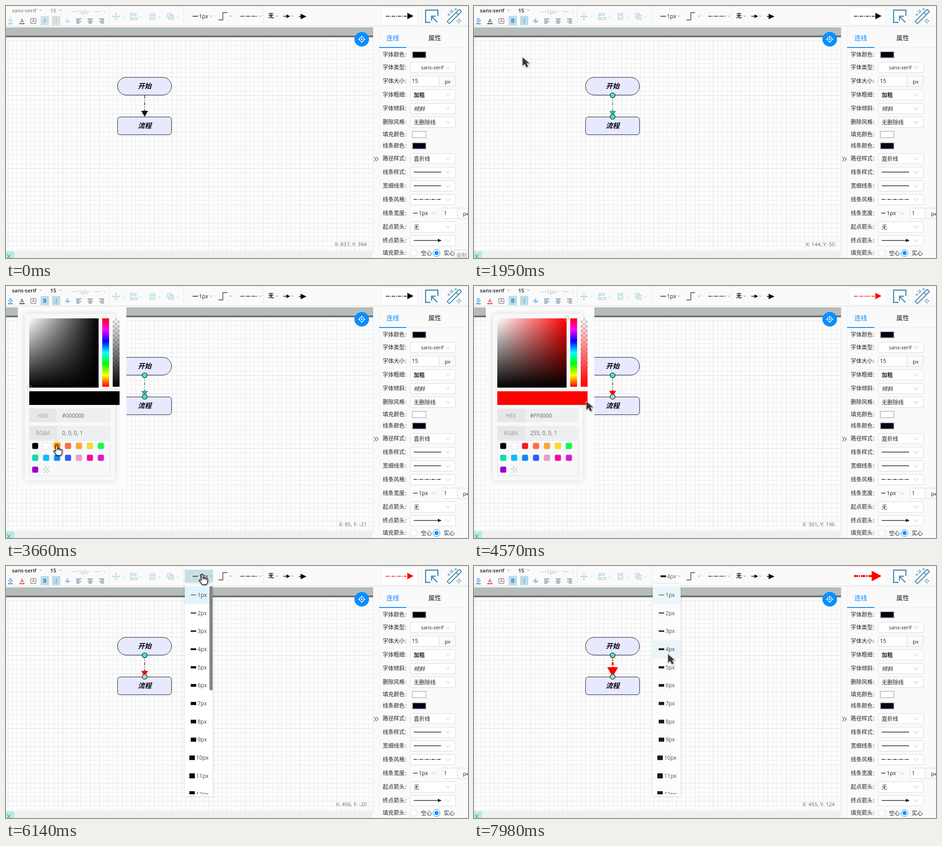
Write an HTML page with a canvas that moves like this. It is 1013 px wide and 553 px high and loops after 8000 ms.

```html
<!DOCTYPE html>
<html lang="zh">
<head>
<meta charset="utf-8">
<style>
html, body { margin: 0; width: 100%; height: 100%; overflow: hidden; background: #fafafa; }
canvas { display: block; }
</style>
</head>
<body>
<canvas id="stage" width="1013" height="553"></canvas>
<script>
const c = document.getElementById('stage').getContext('2d');
const FONT = '"Open Sans", "Noto Sans CJK SC", "Noto Sans CJK", sans-serif';
const BLUE = '#0a8eff', INK = '#050510', RED = '#ff0000', ICE = '#a9d3df', STEEL = '#4489ab';
const LOOP = 8000, STEP = 130.7;

// Tracks: [step, x, y], linear between the points
const cursorTrack = [[0, 1030, 600], [1, 990, 545], [7, 341, 210], [10, 304, 212], [11, 304, 212],
  [15, 106, 112], [18, 35, 36], [23, 35, 36], [27, 111, 349], [30, 111, 349], [37, 300, 214],
  [38, 306, 206], [39, 306, 206], [43, 430, 18], [47, 430, 18], [54, 425, 112], [58, 425, 193]];
const coordTrack = [[0, 837, 394], [2, 837, 394], [7, 383, 152], [10, 346, 154], [11, 346, 154],
  [15, 144, 50], [18, 85, -21], [34, 85, -21], [35, 301, 196], [38, 349, 152], [39, 349, 152],
  [43, 456, -20], [59, 456, -20], [60, 455, 124]];

function at(track, n) {
  const i = track.findIndex(p => p[0] > n);
  if (i < 0) return track[track.length - 1].slice(1);
  const a = track[i - 1], b = track[i], k = (n - a[0]) / (b[0] - a[0]);
  return [a[1] + (b[1] - a[1]) * k, a[2] + (b[2] - a[2]) * k];
}

function rect(x, y, w, h, fill, stroke, r = 0, width = 1) {
  c.beginPath();
  c.roundRect(x, y, w, h, r);
  paint(fill, stroke, width);
}
function paint(fill, stroke, width = 1) {
  if (fill) { c.fillStyle = fill; c.fill(); }
  if (stroke) { c.strokeStyle = stroke; c.lineWidth = width; c.stroke(); }
}
function path(d, stroke, width = 1, fill) {
  const p = new Path2D(d);
  if (fill) { c.fillStyle = fill; c.fill(p); }
  if (stroke) { c.strokeStyle = stroke; c.lineWidth = width; c.stroke(p); }
}
function dot(x, y, r, fill, stroke, width) {
  c.beginPath();
  c.arc(x, y, r, 0, 7);
  paint(fill, stroke, width);
}
function text(s, x, y, color = '#222', size = 12, style = '', align = 'left') {
  c.font = `${style} ${size}px ${FONT}`;
  c.fillStyle = color;
  c.textAlign = align;
  c.textBaseline = 'alphabetic';
  c.fillText(s, x, y + size * .36);
}
function dashed(d, color, width, dash = [7, 2, 2, 2]) {
  c.setLineDash(dash);
  path(d, color, width);
  c.setLineDash([]);
}
const chevron = (x, y, color = '#777', s = 2.3) => path(`M${x - s} ${y - s / 2}l${s} ${s}l${s} ${-s}`, color);
const bigChevron = (x, y) => path(`M${x - 5} ${y - 3}l5 6l5 -6`, '#bbb');
function ramp(x0, y0, x1, y1, colors) {
  const g = c.createLinearGradient(x0, y0, x1, y1);
  colors.forEach((k, i) => g.addColorStop(i / (colors.length - 1), k));
  return g;
}
function checker(x, y, w, h, s) {
  rect(x, y, w, h, '#fff');
  for (let i = 0; i * s < w; i++)
    for (let j = 0; j * s < h; j++)
      if ((i + j) % 2) rect(x + i * s, y + j * s, Math.min(s, w - i * s), Math.min(s, h - j * s), '#d4d4d4');
}

function drawBoard() {
  rect(0, 47, 805, 506, '#fdfdfd');
  for (let x = 4; x < 805; x += 10) rect(x, 68, 1, 470, x % 40 == 4 ? '#e2e2e2' : '#ebebeb');
  for (let y = 76; y < 538; y += 10) rect(0, y, 805, 1, y % 40 == 36 ? '#e2e2e2' : '#ebebeb');
  rect(0, 47, 805, 18, '#b5bcba');
  rect(0, 65, 805, 3, '#626466');
  rect(0, 68, 805, 2, '#d5d5d5');
  rect(0, 538, 805, 15, '#f0f0f0');
  rect(0, 538, 18, 15, '#b5ece4');
  path('M2 545l8 9M10 545l-8 9', '#456');
  dot(780, 73, 16, BLUE);
  dot(780, 73, 5, null, '#fff', 1.5);
  dot(780, 73, 1.8, '#fff');
  path('M780 65v4M780 77v4M772 73h4M784 73h4', '#fff', 1.5);
}

function drawFlow(n) {
  const picked = n >= 10, red = n >= 29, thick = n >= 60;
  const color = red ? RED : picked ? '#4aa3a3' : INK;
  const [base, half] = thick ? [222, 12] : [230, 7.5];
  dashed(`M304 196V${base}`, thick ? RED : red ? INK : color, thick ? 4 : picked && !red ? 2 : 1.2, [7, 3, 2, 3]);
  path(`M304 243L${304 - half} ${base}H${304 + half}Z`, null, 0, color);
  rect(244.5, 156.5, 118.5, 39, '#e7e9ff', '#15151f', 19.5);
  rect(244.5, 243.5, 118.5, 39, '#e7e9ff', '#15151f', 6);
  text('开始', 304, 176, '#080810', 15, 'italic bold', 'center');
  text('流程', 304, 263, '#080810', 15, 'italic bold', 'center');
  if (picked) {
    dot(304, 196, 5.5, '#3fe8c3', '#111', 1.2);
    dot(304, 243, 5.5, red ? '#a2dcc6' : '#3fe8c3', '#111', 1.2);
  }
}

function drawToolbar(n) {
  const on = n >= 10, red = n >= 30, ink = on ? '#1b1b1b' : '#8f8f8f';
  rect(0, 0, 1013, 47, '#fafafa');
  rect(0, 43, 1013, 1, '#e3e3e3');
  rect(0, 44, 1013, 3, '#f5f5f5');
  for (const x of [226, 389, 564]) rect(x, 0, 1, 43, '#e9e9e9');

  text('sans-serif', 13, 10, ink, 11.5, '600');
  text('15', 97, 10, ink, 11.5, '600');
  chevron(76, 9); chevron(119.5, 9);
  path('M145 12.5h13M194 12.5h13', '#bbb');
  text('1px', 159, 13, '#bbb', 12);
  chevron(183, 12, '#bbb'); chevron(217, 12, '#bbb');

  const tone = on ? '#258edb' : '#91c8eb';
  path('M6 32l4-4l4 4l-4 4zM8 26l3 3', tone, 1.2);
  rect(4, 38, 11, 2, tone);
  if (n >= 18 && n < 24) rect(27, 23, 17, 20, '#d5e4e8');
  const pen = red ? RED : on ? '#111' : '#444';
  text('A', 35, 33, pen, 12, '', 'center');
  rect(29, 38, 12, 1.5, pen);
  rect(54.5, 27.5, 11, 11, null, '#666');
  text('A', 60, 33, '#555', 9, '', 'center');
  for (const x of [76, 101]) rect(x, 22, 18, 20, on ? '#bbdce5' : '#d5e1e3');
  text('B', 85, 33, tone, 12, 'bold', 'center');
  text('I', 110, 33, tone, 13, 'italic', 'center');
  text('S', 135, 33, tone, 12, '', 'center');
  path('M129 33.5h12', tone);
  [0, 2, 4].forEach((k, i) => {
    const x = 154 + i * 25;
    path(`M${x} 28.5h11M${x + k} 31.5h7M${x} 34.5h11M${x + k} 37.5h7`, '#174a68', 1.2);
  });

  path('M241 16v14M234 23h14M239 18l2-2l2 2M239 28l2 2l2-2M236 21l-2 2l2 2M246 21l2 2l-2 2', ICE, 1.3);
  path('M273.5 15v17M276 16.5h9v4h-9zM276 25.5h13v4h-13z', ICE, 1.5);
  path('M314 16.5h14M314 29.5h14M316 20h10v6h-10z', ICE, 1.5);
  path('M354 16.5h9v9h-9zM358 20.5h9v9h-9z', ICE, 1.5);
  for (const x of [257, 297, 337, 376]) chevron(x, 24, ICE);

  if (n >= 45 && n < 50) rect(392, 8, 62, 28, '#c7dfe5');
  const thick = n >= 60;
  path('M409 22.5h12', '#111', thick ? 4 : 1.4);
  text(thick ? '4px' : '1px', 423, 23, thick ? '#666' : '#222', 12);
  chevron(449.5, 22);
  path('M466 30.5h9.5v-16h9.5', '#333', 1.3);
  chevron(493, 22);
  dashed('M514 22.5h37', '#222', 1.3);
  chevron(558, 22);
  text('无', 575, 22, '#111', 12, 'bold'); chevron(594, 22);
  path('M608 22.5h8', INK, 1.4);
  path('M615 18.5l8 4l-8 4z', null, 0, INK);
  chevron(628, 22);
  path('M642 23h6', INK, 1.4);
  path('M646 17l13 6l-13 6z', null, 0, INK);

  rect(823.5, 3.5, 79, 38, '#fff', '#f0f0f0');
  const color = n >= 29 ? RED : INK;
  if (thick) {
    dashed('M833 22h40', color, 4, [9, 2, 3, 2]);
    path('M872 10.5l21.5 11.5l-21.5 11.5z', null, 0, color);
  } else {
    dashed('M833 22.5h48', color, 1.3);
    path('M880 15l13.5 7l-13.5 7z', null, 0, color);
  }
  for (const x of [913.5, 963.5]) rect(x, 3.5, 39, 38, '#fcfcfc', '#f2f2f2');
  path('M931 36H920V9h27v13M946 36L933 23M933 32v-9.500h9.500', STEEL, 2.4);
  drawWand();
}

function drawWand() {
  c.save();
  c.translate(983, 23);
  c.rotate(-Math.PI / 4);
  rect(-19, -3.5, 38, 7, null, STEEL, 2, 2);
  path('M9 -3.5v7', STEEL, 2);
  c.restore();
  for (const [x, y, s] of [[977, 12, 4], [993, 33, 5], [986, 7, 2.5], [971, 19, 2.5]]) {
    const q = s * .3;
    path(`M${x} ${y - s}l${q} ${s - q}l${s - q} ${q}l${q - s} ${q}l${-q} ${s - q}l${-q} ${q - s}l${q - s} ${-q}l${s - q} ${-q}z`, STEEL);
  }
}

function drawPanel() {
  rect(805, 47, 208, 506, '#fafafa');
  rect(818, 47, 1, 506, '#ededed');
  path('M807 331l4 5l-4 5M812 331l4 5l-4 5', '#444', 1.2);
  text('连线', 848, 70, BLUE, 14, '', 'center');
  text('属性', 940, 70, '#222', 14, '', 'center');
  rect(818, 91, 195, 1, '#eaeaea');
  rect(818, 90, 60, 2, BLUE);

  const select = y => {
    rect(886.5, y - 11.5, 99, 23, '#fff', '#d9d9d9', 2);
    bigChevron(969, y);
  };
  const box = (y, color) => rect(891, y - 7, 30, 14, color, '#c8c8c8', 0, 2);
  const chosen = (s, style) => y => { select(y); text(s, 894, y + 1, '#222', 12, style); };
  const stroke = kind => y => {
    select(y);
    const d = `M894 ${y - .5}h60`;
    if (kind == 'dash') dashed(d, '#222', 1.3); else path(d, '#222', 1.3);
    if (kind == 'arrow') path(`M947 ${y - 4}l8 3.5l-8 3.5z`, null, 0, '#000');
  };
  const rows = [
    ['字体颜色', 107, y => box(y, '#000010')],
    ['字体类型', 135, y => { select(y); text('sans-serif', 910, y, '#222', 11); }],
    ['字体大小', 165, y => {
      rect(886.5, y - 11.5, 99, 23, '#fff', '#d9d9d9', 2);
      rect(949.5, y - 11.5, 36, 23, '#fafafa', '#d9d9d9', 2);
      text('15', 890, y, '#222', 12);
      text('px', 962, y + 1, '#222', 11.5);
    }],
    ['字体粗细', 195, chosen('加粗', 'bold')],
    ['字体倾斜', 225, chosen('倾斜', 'italic')],
    ['删除风格', 255, chosen('无删除线')],
    ['填充颜色', 282, y => box(y, '#fff')],
    ['线条颜色', 307, y => box(y, '#000018')],
    ['路径样式', 335, chosen('直折线')],
    ['线条样式', 365, stroke()],
    ['宽细线条', 395, stroke()],
    ['线条风格', 425, stroke('dash')],
    ['线条宽度', 455, y => {
      path(`M893 ${y - .5}h9`, '#222', 1.5);
      text('1px', 905, y, '#222', 12);
      bigChevron(939, y);
      rect(956.5, y - 11.5, 60, 23, '#fff', '#d9d9d9', 2);
      rect(989.5, y - 11.5, 40, 23, '#fafafa', '#d9d9d9');
      text('1', 960, y, '#222', 12);
      text('px', 1002, y + 1, '#222', 11.5);
    }],
    ['起点箭头', 485, chosen('无')],
    ['终点箭头', 515, stroke('arrow')],
    ['填充箭头', 542, y => {
      dot(894, y, 7.5, '#fff', '#d9d9d9');
      text('空心', 910, y + 1);
      dot(944, y, 7.5, '#fff', BLUE);
      dot(944, y, 4.5, BLUE);
      text('实心', 960, y + 1);
    }]
  ];
  for (const [label, y, draw] of rows) {
    text(label, 826, y);
    text(':', 875, y);
    draw(y);
  }
}

function drawPicker(n) {
  const alpha = { 20: .6, 21: .95, 37: .4 }[n] ?? (n > 21 && n < 37 ? 1 : 0);
  if (!alpha) return;
  const red = n >= 29, color = red ? RED : '#000';
  c.save();
  c.globalAlpha = alpha;
  c.translate(0, 47);
  c.scale(1, .8 + .2 * alpha);
  c.translate(0, -47);
  rect(26, 47, 238, 395, '#fcfcfc');
  c.shadowColor = 'rgba(0,0,0,.15)';
  c.shadowBlur = 12;
  rect(41, 61, 198, 366, '#f7f8fa');
  c.shadowColor = 'transparent';
  rect(51, 71, 152, 152, ramp(51, 0, 203, 0, ['#fff', color]));
  rect(51, 71, 152, 152, ramp(0, 71, 0, 223, ['rgba(0,0,0,0)', '#000']));
  dot(red ? 203 : 51, red ? 71 : 223, 5, null, '#bbb');
  rect(211, 71, 15, 150, ramp(0, 71, 0, 221, ['#f00', '#f0f', '#00f', '#0ff', '#0f0', '#ff0', '#f00']));
  checker(234, 71, 15, 150, 5);
  rect(234, 71, 15, 150, ramp(0, 71, 0, 221, [red ? 'rgba(255,0,0,0)' : 'rgba(0,0,0,0)', color]));
  rect(51, 231, 198, 30, color);
  [['HEX', red ? '#FF0000' : '#000000', 269], ['RGBA', red ? '255, 0, 0, 1' : '0, 0, 0, 1', 307]].forEach(([k, v, y]) => {
    rect(51, y, 178, 30, '#eeeff1');
    rect(51, y, 60, 30, '#e6e7e9');
    text(k, 81, y + 16, '#999', 12, '', 'center');
    text(v, 123, y + 16, '#666', 12);
  });
  rect(51.5, 338.5, 177, 78, '#f7f8fa', '#ddd');
  ['#000', '#fff', '#ff1420', '#ff6b45', '#ffa72b', '#f8dc2a', '#0aff45', '#0ddcab', '#00c0ff', '#0a8aff',
    '#2d58ff', '#eb9ecb', '#ff00a0', '#d916d2', '#9d00cf', ''].forEach((k, i) => {
    const x = 57 + i % 7 * 24, y = 344 + Math.floor(i / 7) * 26;
    if (k) rect(x, y, 14, 14, k, '#ddd', 3);
    else checker(x, y, 14, 14, 4);
  });
  c.restore();
}

function drawWidths(n) {
  if (n < 47) return;
  c.save();
  c.globalAlpha = n == 61 ? .93 : 1;
  c.shadowColor = 'rgba(0,0,0,.15)';
  c.shadowBlur = 6;
  rect(392, 40, 61, 465, '#fff');
  c.shadowColor = 'transparent';
  c.beginPath();
  c.rect(392, 40, 61, 461);
  c.clip();
  rect(392, 44, 61, 40, n >= 60 ? '#eaf7fa' : '#e1f5fd');
  if (n >= 60) rect(392, 163, 61, 40, '#e8f5f6');
  for (let k = 1; k <= 12; k++) {
    const y = 63.5 + (k - 1) * 39.7, x = k < 10 ? 405 : 402;
    rect(x, y - k / 2, 12, k, '#080808');
    text(k + 'px', x + 15, y, '#444', 12);
  }
  if (n < 53) rect(446, 44, 7.5, 229, '#858585', null, 4);
  c.restore();
}

function drawCursor(n) {
  const [x, y] = at(cursorTrack, n);
  const hand = n >= 18 && n < 33 || n >= 42 && n < 60;
  const ring = { 28: 10, 58: 10, 59: 16 }[n];
  if (ring) dot(x, y, ring, 'rgba(255,220,0,.5)');
  c.save();
  c.translate(x, y);
  c.lineJoin = 'round';
  c.shadowColor = 'rgba(0,0,0,.35)';
  c.shadowBlur = 3;
  c.shadowOffsetX = c.shadowOffsetY = 1;
  if (hand) {
    path('M-2 1q2-2 4 0v8q2-2 4 0q2-1 3 1q3-1 3 2v5q0 3-3 6h-9q-2-4-6-8q-1-3 1-3l3 2z', '#111', 1.3, '#fff');
    c.shadowColor = 'transparent';
    path('M2 8v4M6 9v3M9 10v3', '#111', 1);
  } else {
    const arrow = 'M.5 1v18l4.5-4l4 7.5l3.5-2l-3.5-7h6z';
    path(arrow, '#ddd', 2);
    c.shadowColor = 'transparent';
    path(arrow, null, 0, '#383838');
  }
  c.restore();
}

function draw(time) {
  const n = Math.min(61, Math.floor((time % LOOP + 20) / STEP));
  const [x, y] = at(coordTrack, n).map(Math.round);
  drawBoard();
  drawFlow(n);
  text(`X: ${x}, Y: ${y}`, 791, 523, '#666', 11.5, '', 'right');
  drawToolbar(n);
  drawPanel();
  drawPicker(n);
  drawWidths(n);
  if (n == 0) {
    rect(983.5, 535.5, 32, 20, 'rgba(250,250,250,.85)', '#ccc');
    text('录制', 987, 548, '#999', 12);
  }
  drawCursor(n);
}

const start = performance.now();
(function loop() {
  draw(performance.now() - start);
  requestAnimationFrame(loop);
})();
</script>
</body>
</html>
```
